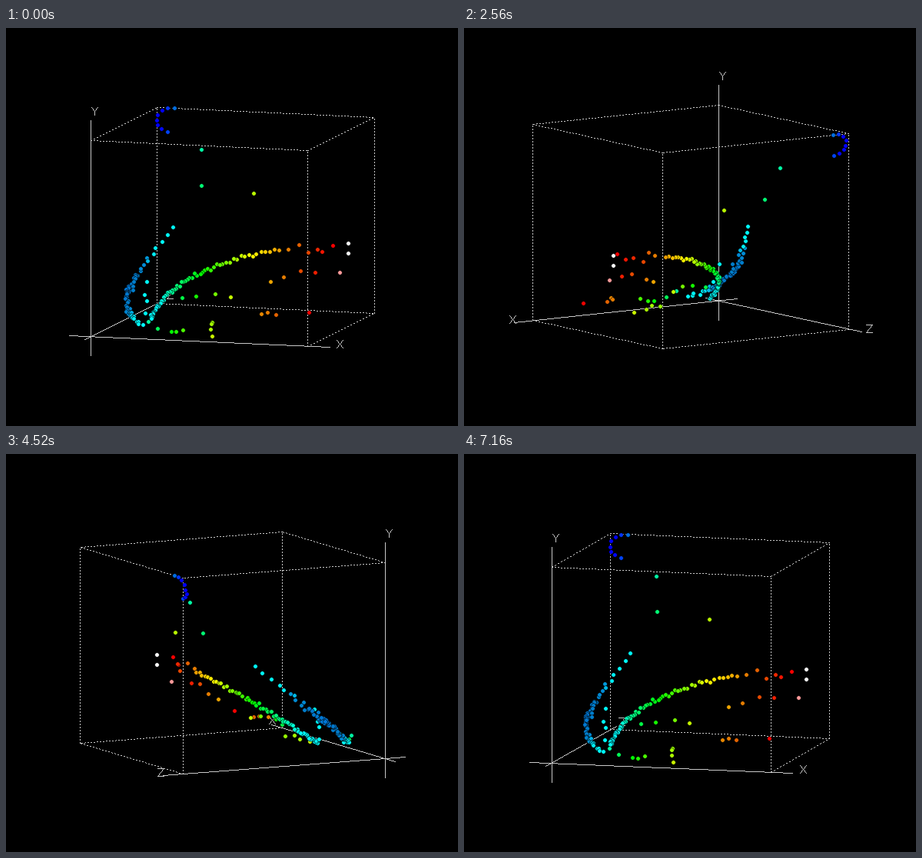
Animation, 588 px wide and 518 px high, one loop 7.2 s. Source, as a matplotlib script:

```python
import numpy as np
import matplotlib.pyplot as plt
from matplotlib.animation import FuncAnimation
from matplotlib.colors import hsv_to_rgb

W, H, DPI = 588, 518, 100
FRAMES, STEP, START = 180, 2, 17      # degrees per frame, first angle
SIDE, HEIGHT, TILT = 295, 255, 0.1525
CX, FLOOR = 294.9, 386.5
HALF = SIDE / 2
GREY = 200
PX = 72 / DPI
rng = np.random.default_rng(11)


def project(p, a):
    """Pixel positions of (x, height, z) points turned by angle a."""
    x, h, z = np.asarray(p, float).T
    c, s = np.cos(a), np.sin(a)
    return np.floor(np.column_stack([CX + x * c + z * s,
                                     FLOOR + TILT * (x * s - z * c) - h]))


def scatter(x, h, z, jitter):
    p = np.column_stack([x, h, z])
    return p + rng.normal(0, 1, p.shape) * jitter


def strand(a, b, n, jitter=0):
    """n points from a to b with some scatter."""
    return scatter(*np.linspace(a, b, n).T, jitter)


def main_arm():
    """Cyan to amber curve, densest at its cyan end."""
    t = .78 * np.linspace(0, 1, 62) ** 1.3
    return scatter(-86 + 233 * t ** 2,
                   16 + 91 * (1 - (1 - t) ** 1.45),
                   -80 + 115 * (1 - (1 - t) ** 1.6), (.7, 1.2, .8))


def blue_arm():
    """Bent band, thinning out upwards."""
    s = np.linspace(0, 1, 64)
    z = -126 + 80 * s ** .75 + 57 * s ** 12
    u = z + 75
    return scatter(-119.5 + .01045 * u ** 2 - 6.65e-5 * u ** 3,
                   15 + .295 * (z + 126) ** 1.2, z, (1.4, 1.5, 2))


def corner_arc():
    q = np.radians(np.linspace(80, 260, 8))
    return scatter(-128 + 19 * np.cos(q), 240 + 15 * np.sin(q),
                   143 + 4 * np.sin(q), .4)


pts = np.vstack([
    main_arm(), blue_arm(), corner_arc(),
    strand((-73, 210, 99), (-65, 167, 76), 2),
    strand((4, 159, 81), (4, 159, 81), 1),
    strand((-98, 57, -72), (-94, 28, -79), 4, (3, 4, 2)),
    strand((-20, 20, -147), (-70, 14, -137), 5, (2, 5, 1)),
    strand((-2, 15, -72), (4, 4, -115), 4, (3, 3, 2)),
    strand((6, 41, -29), (-55, 41, -49), 4, (2, 2, 2)),
    strand((65, 29, -85), (82, 25, -75), 3, (1, 4, 3)),
    strand((124, 31, -66), (124, 31, -66), 1),
    strand((53, 60, -10), (140, 78, 13), 5, (3, 5, 4)),
    strand((72, 97, 22), (130, 104, 24), 6, (2, 5, 5)),
    strand((147, 94, 35), (147, 107, 35), 2),
])

# Hue runs along x; the hot end fades to white.
x = pts[:, 0]
hue = np.interp(x, (-140, -122, -108, -99, -83, -70, -40, 20, 75, 125),
                (240, 207, 200, 180, 180, 153, 120, 60, 30, 0)) / 360
sat = 1 - np.clip((x - 133) / 13, 0, 1)
val = (1 - .2 * np.exp(-((x + 115) / 12) ** 2)
       - .1 * np.exp(-((x - 80) / 40) ** 2))
colors = hsv_to_rgb(np.column_stack([hue, sat, val]))

# Axes start at one corner; the other nine edges are dotted.
corner = np.array([-HALF, 0, -HALF])
spans = np.diag([SIDE, HEIGHT, SIDE])
edges = []
for k in range(3):
    d, e, f = np.roll(spans, -k, axis=0)
    edges += [(corner + o, corner + o + d) for o in (e, f, e + f)]
axes = [(corner - .1 * d, corner + 1.1 * d) for d in spans]
tips = corner + 1.13 * spans
glyphs = [
    [[(1, 0), (9, -10)], [(1, -10), (9, 0)]],
    [[(1, -10), (5, -5), (9, -10)], [(5, -5), (5, 0)]],
    [[(1, -10), (9, -10), (1, 0), (9, 0)]],
]


def line(img, a, b, dotted=False):
    """One-pixel line, optionally two pixels on and two off."""
    n = int(np.abs(b - a).max()) + 1
    px, py = np.rint(np.linspace(a, b, n)).astype(int).T
    on = np.arange(n) % 4 < 2 if dotted else slice(None)
    img[py[on], px[on]] = GREY


fig = plt.figure(figsize=(W / DPI, H / DPI), dpi=DPI, facecolor="black")
ax = fig.add_axes([0, 0, 1, 1])
ax.axis("off")
frame = ax.imshow(np.zeros((H, W), np.uint8), cmap="gray", vmin=0, vmax=255,
                  extent=(0, W, H, 0), aspect="auto", interpolation="nearest")
dots = ax.scatter(pts[:, 0], pts[:, 1], s=(5.5 * PX) ** 2, c=colors,
                  edgecolors="black", linewidths=.5 * PX, zorder=3)
ax.set(xlim=(0, W), ylim=(H, 0))


def draw(n):
    a = np.radians(START + STEP * n)
    img = np.zeros((H, W), np.uint8)
    for e in edges:
        line(img, *project(e, a), dotted=True)
    for e in axes:
        line(img, *project(e, a))
    for at, strokes in zip(project(tips, a), glyphs):
        for stroke in strokes:
            p = at + np.array(stroke)
            for start, end in zip(p, p[1:]):
                line(img, start, end)
    frame.set_data(img)
    order = np.argsort(pts[:, 0] * np.sin(a) - pts[:, 2] * np.cos(a))
    dots.set_offsets(project(pts, a)[order] + .5)
    dots.set_facecolors(colors[order])
    return frame, dots


anim = FuncAnimation(fig, draw, frames=FRAMES, interval=40, repeat=True,
                     repeat_delay=0)
plt.show()
```
